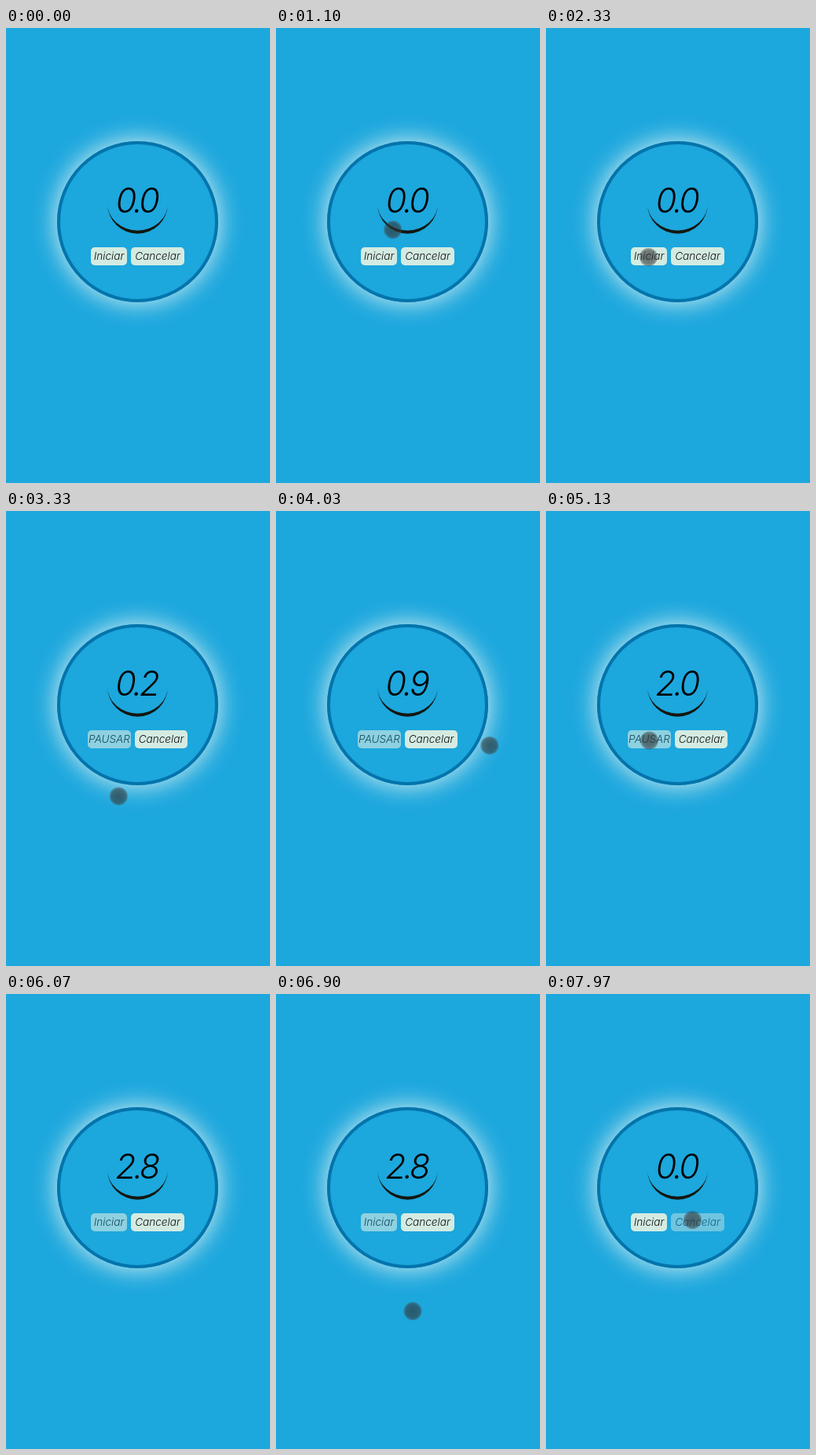
These frames come from a looping animation (336x579 px, 8 s). An HTML page with a canvas:

```html
<!DOCTYPE html>
<html lang="es">
<head>
<meta charset="utf-8">
<title>Cronómetro</title>
<style>
html, body { margin: 0; width: 100%; height: 100%; overflow: hidden; background: #1ca7dd; }
#stage { position: relative; width: 336px; height: 579px; overflow: hidden; }
#stage > * { position: absolute; box-sizing: border-box; }
#ring { left: 65.3px; top: 144px; width: 205px; height: 205px; border-radius: 50%;
  border: 4px solid #0474ab; box-shadow: 0 0 32px #e2f3f2; }
#time { left: 105px; top: 188.5px; width: 122px; text-align: center; letter-spacing: -.08em;
  font: italic 300 43px/60px Inter, "Open Sans", sans-serif; color: #000; }
.btn { top: 279px; height: 22.5px; border-radius: 5px; background: #d4ebe2; color: #111;
  text-align: center; white-space: nowrap;
  font: italic 300 13.6px/23px Inter, "Open Sans", sans-serif; font-feature-settings: "cv11"; }
canvas { left: 0; top: 0; }
</style>
</head>
<body>
<div id="stage">
  <div id="ring"></div>
  <div id="time">0.0</div>
  <div id="main" class="btn">Iniciar</div>
  <div id="cancel" class="btn">Cancelar</div>
  <canvas id="view" width="336" height="579"></canvas>
</div>
<script>
const LOOP = 8000, START = 3060, PAUSE = 5900, RESET = 7840;
const byId = id => document.getElementById(id);
const timeEl = byId('time'), mainBtn = byId('main'), cancelBtn = byId('cancel');
const ctx = byId('view').getContext('2d');

// Each stroke is a smooth curve through evenly timed points; the pointer then rests.
const strokes = [
  { from: 700, to: 1500, pts: [[330, 570], [256, 412], [149, 257], [122, 262], [122, 290]] },
  { from: 1500, to: 2330, pts: [[122, 290], [114, 309], [130, 314], [130.5, 291.5]] },
  { from: START, to: 5000, pts: [[130.5, 291.5], [140, 370], [62, 334], [271.5, 298.5],
    [270, 290], [190, 292], [131.5, 292]] },
  { from: 6170, to: 7510, pts: [[135, 344], [113, 390], [212, 414], [160, 397],
    [166, 368], [186.5, 287.5]] }
];

const spline = (a, b, c, d, k) =>
  b + k / 2 * (c - a + k * (2 * a - 5 * b + 4 * c - d + k * (3 * (b - c) + d - a)));

function pointerAt(t) {
  const stroke = strokes.filter(s => s.from <= t).pop();
  if (!stroke || (t >= PAUSE && stroke.from < PAUSE)) return null;
  const { from, to, pts } = stroke, last = pts.length - 1;
  const u = Math.min(1, (t - from) / (to - from)) * last;
  const i = Math.min(last - 1, Math.floor(u));
  const near = [-1, 0, 1, 2].map(n => pts[Math.max(0, Math.min(last, i + n))]);
  return [0, 1].map(axis => spline(...near.map(p => p[axis]), u - i));
}

function drawSmile() {
  ctx.fillStyle = '#14170f';
  ctx.beginPath();
  ctx.ellipse(167.5, 223.2, 38.5, 38.5, 0, 0, Math.PI);
  ctx.ellipse(167.5, 223.2, 38.5, 34.5, 0, Math.PI, 0, true);
  ctx.fill();
}

function drawPointer([x, y]) {
  const g = ctx.createRadialGradient(x, y, 0, x, y, 11.5);
  g.addColorStop(0, 'rgba(48,50,52,.68)');
  g.addColorStop(.75, 'rgba(50,54,56,.6)');
  g.addColorStop(1, 'rgba(75,75,75,.42)');
  ctx.fillStyle = g;
  ctx.beginPath();
  ctx.arc(x, y, 11.5, 0, Math.PI * 2);
  ctx.fill();
}

function place(btn, left, width, opacity) {
  btn.style.left = left + 'px';
  btn.style.width = width + 'px';
  btn.style.opacity = opacity;
}

function render(t) {
  const running = t >= START && t < PAUSE;
  const elapsed = t >= RESET ? 0 : Math.max(0, Math.min(t, PAUSE) - START);
  timeEl.textContent = (Math.floor(elapsed / 100) / 10).toFixed(1);
  mainBtn.textContent = running ? 'PAUSAR' : 'Iniciar';
  place(mainBtn, running ? 104 : 108, running ? 55 : 46, t >= START && t < RESET ? .62 : 1);
  place(cancelBtn, running ? 164 : 159, running ? 67 : 68, t >= RESET ? .45 : 1);

  ctx.clearRect(0, 0, 336, 579);
  drawSmile();
  const p = pointerAt(t);
  if (p) drawPointer(p);
}

const origin = performance.now();
function tick() {
  render((performance.now() - origin) % LOOP);
  requestAnimationFrame(tick);
}
tick();
</script>
</body>
</html>
```
